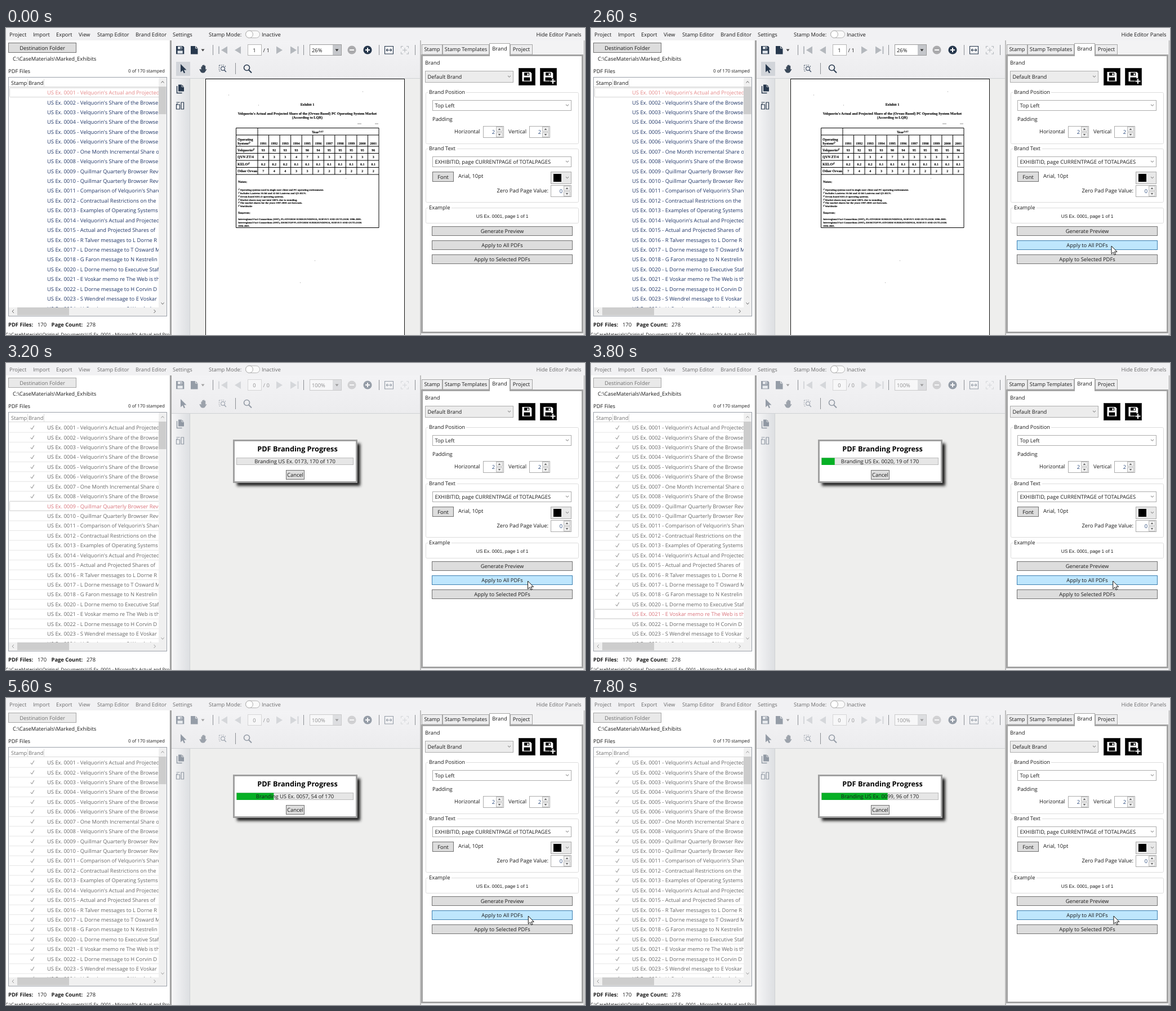
An HTML page that plays this animation: 1028x545 px, repeating every 8000 ms.

```html
<!DOCTYPE html>
<html lang="en">
<head>
<meta charset="utf-8">
<title>PDF branding</title>
<style>
html,body{margin:0;width:100%;height:100%;overflow:hidden;background:#fff}
svg{display:block;width:100%;height:100%}
text{font:9.4px "Open Sans",sans-serif;fill:#1a1a1a;text-rendering:geometricPrecision;white-space:pre}
.b{font-weight:700}
.s{font-size:8px}
.h{font-size:12.7px;font-weight:700;fill:#000}
.arial{font:8.3px "Liberation Sans",sans-serif}
.mid{text-anchor:middle}
.end{text-anchor:end}
.doc text{font:bold 4.6px "Liberation Serif",serif;fill:#000;stroke:#000;stroke-width:.12}
.doc .t{font-size:6.3px}
.doc .c{font-size:6px}
.doc .sup{font-size:4px}
.row text{fill:#1f3566}
.row.on text{fill:#e58888}
.row .box,.row .tick,.row .rule{visibility:hidden}
.row.on .box,.row.done .tick,.busy .rule{visibility:visible}
.busy .row text{fill:#666}
.busy .row.on text{fill:#d9737b}
.busy .dim{opacity:.62}
.busy .fade{opacity:.45}
.sel{fill:#d2d5da}
.busy .sel{fill:none}
#hot.on rect{fill:#bee6fd;stroke:#3c7fb1}
</style>
</head>
<body>
<svg id="stage" viewBox="0 0 1028 545" preserveAspectRatio="none"></svg>
<script>
const svg = document.getElementById('stage');
const ink = '#27384d';

// markup helpers
const rect = (x, y, x2, y2, fill, stroke, more = '') =>
  `<rect x="${x}" y="${y}" width="${x2 - x}" height="${y2 - y}" fill="${fill}"${stroke ? ` stroke="${stroke}"` : ''} ${more}/>`;
const circle = (x, y, r, fill, stroke = 'none', w = 1) =>
  `<circle cx="${x}" cy="${y}" r="${r}" fill="${fill}" stroke="${stroke}" stroke-width="${w}"/>`;
const text = (x, y, s, cls = '', more = '') => `<text x="${x}" y="${y}" class="${cls}" ${more}>${s}</text>`;
const path = (d, fill = 'none', stroke = 'none', w = 1, more = '') =>
  `<path d="${d}" fill="${fill}" stroke="${stroke}" stroke-width="${w}" ${more}/>`;
const group = (s, cls = '', more = '') => `<g class="${cls}" ${more}>${s}</g>`;
const chevron = (x, y, dx, dy) =>
  path(dx ? `M${x - dx} ${y - 3}L${x + dx} ${y}L${x - dx} ${y + 3}` : `M${x - 2.5} ${y - dy}L${x} ${y + dy}L${x + 2.5} ${y - dy}`, 'none', '#666');
const button = (x, y, x2, y2, s) => rect(x + .5, y + .5, x2 - .5, y2 - .5, '#ddd', '#707070') +
  text((x + x2) / 2, (y + y2) / 2 + 3.5, s, 'mid');
const combo = (x, y, x2, y2, s, fill = '#fff') => rect(x + .5, y + .5, x2 - .5, y2 - .5, fill, '#acacac') +
  text(x + 4.5, (y + y2) / 2 + 3.7, s) + chevron(x2 - 7.5, (y + y2) / 2 - .5, 0, 1.2);
const spinner = (x, y, v) => {
  const half = dy => rect(x + 23.5, y + dy, x + 34.5, y + dy + 8, '#f0f0f0', '#bbb');
  return rect(x + .5, y + .5, x + 36.5, y + 20.5, '#fff', '#acacac') + text(x + 21, y + 14, v, 'end', 'style="fill:#2b4a7c"') +
    half(1.5) + half(11.5) + path(`M${x + 26.7} ${y + 7}l2.3 -3 2.3 3zM${x + 26.7} ${y + 14}l2.3 3 2.3 -3z`, '#666');
};
const box = (y, y2, s, w) => rect(745.5, y + .5, 1016.5, y2 + .5, 'none', '#dcdcdc', 'rx="2"') +
  rect(749, y - 4, 751 + w, y + 5, '#fff') + text(751, y + 3.3, s);
const floppy = (x, y, k, c, hole) => group(
  path('M0 0H12L14 2V14H0Z', c) + rect(3, 1, 10.5, 5.5, hole) + rect(7.5, 2, 9.5, 5, c) + rect(2.5, 8, 11.5, 13, hole),
  '', `transform="translate(${x} ${y}) scale(${k})"`);
const bar = (x, y, y2) => path(`M${x} ${y}V${y2}`, 'none', '#8b8e93');

const exhibitNo = n => String(n + (n > 18) + (n > 30) + (n > 44)).padStart(4, '0');
const share = "Velquorin's Share of the Browser M", actual = "Velquorin's Actual and Projected S";
const titles = [actual, share, share, share, share, share, 'One Month Incremental Share of', share,
  'Quillmar Quarterly Browser Revenue', 'Quillmar Quarterly Browser Revenue', "Comparison of Velquorin's Share",
  'Contractual Restrictions on the', 'Examples of Operating Systems', actual, 'Actual and Projected Shares of',
  'R Talver messages to L Dorne R', 'L Dorne message to T Osward M', 'G Faron message to N Kestrelin', 'L Dorne memo to Executive Staff',
  'E Voskar memo re The Web is the', 'L Dorne message to H Corvin D', 'S Wendrel message to E Voskar', 'H Corvin memo to S Wendrel'];

function menu() {
  const items = [[6, 'Project'], [48, 'Import'], [89, 'Export'], [129, 'View'], [162, 'Stamp Editor'], [230, 'Brand Editor'],
    [296, 'Settings'], [360, 'Stamp Mode:'], [454, 'Inactive']];
  return rect(0, 0, 1028, 22, '#f1f1f3') +
    group(items.map(([x, s]) => text(x, 15, s)).join('') + text(1021.5, 15, 'Hide Editor Panels', 'end'), 'dim') +
    rect(425.5, 5, 450.5, 17.5, '#fafafa', '#b5b5b5', 'rx="6.2"') + circle(432, 11.2, 6.4, '#fff', '#aaa');
}

function row(title, i) {
  const y = 114.5 + 17.43 * i;
  return group(path(`M6 ${y + 8.7}H271`, 'none', '#e6e6e6', 1, 'class="rule"') +
    rect(6.5, y - 8.3, 280, y + 8.2, '#fff', '#d3d3d3', 'class="box" rx="1"') +
    path(`M43.8 ${y + .5}l2.2 2.8 3.8 -6.6`, 'none', '#777', .9, 'class="tick"') +
    text(73, y + 3.6, `US Ex. ${exhibitNo(i + 1)} - ${title}`), 'row');
}

function files() {
  return rect(0, 22, 290, 545, '#fff') + group(button(4, 26, 125, 44, 'Destination Folder'), 'dim') +
    text(12, 58.3, 'C:\\CaseMaterials\\Marked_Exhibits') + text(4, 79.5, 'PDF Files') + text(282, 79, '0 of 170 stamped', 's end') +
    rect(4.5, 87.5, 285.5, 511.5, '#fff', '#9a9fa8') +
    group(text(9, 101, 'Stamp') + text(40, 101, 'Brand'), 'dim') + path('M38.5 90V104M67.5 90V104M5 104.5H271', 'none', '#dadada') +
    group(titles.map(row).join(''), '', 'clip-path="url(#list)"') +
    rect(271, 88, 285, 496, '#f0f0f0') + rect(271, 104, 284.5, 153, '#cdcdcd') + rect(5, 496, 285, 511, '#f0f0f0') +
    rect(20, 496, 112, 510, '#cdcdcd') +
    group(chevron(278, 96, 0, -1.5) + chevron(278, 489, 0, 1.5) + chevron(12.5, 503, -1.5) + chevron(264, 503, 1.5), 'dim') +
    text(4, 530, 'PDF Files:', 'b') + text(56, 530, '170') + text(80.5, 530, 'Page Count:', 'b') + text(143, 530, '278') +
    text(-1, 546.5, "C:\\CaseMaterials\\Original_Documents\\US Ex. 0001 - Microsoft's Actual and Proj", 's') +
    rect(290, 22, 294, 545, '#f0f0f0') + rect(291, 22, 294, 545, '#a3a3a3');
}

function toolbar() {
  const round = (x, c, plus) => circle(x, 39, 7.6, c) + path(`M${x - 4} 39h8${plus ? `M${x} 35v8` : ''}`, 'none', '#fff', 2);
  const top = floppy(302, 32, 1.02, ink, '#dfe4ea') +
    path('M328 32h8.5l4 4v10.5h-12.5z', ink) + path('M336.5 32v4h4', 'none', '#eee') + path('M346.5 37.5h6l-3 4z', '#444') +
    path('M377 32.5h2v13.5h-2zM393 32.5v13.5l-11-6.75zM417 32.5v13.5l-11-6.75zM480 32.5v13.5l11-6.75zM505 32.5v13.5l11-6.75zM517.5 32.5h2v13.5h-2z', '#b4b8bd') +
    rect(429.5, 29.5, 453.5, 48.5, '#fff', '#b5b5b5') + text(441, 42.5, '1', 'mid', 'id="page"') + text(456.5, 42.5, '/ 1', '', 'id="pages"') +
    rect(539.5, 29.5, 595.5, 48.5, '#fff', '#9a9a9a') + rect(580, 30, 595, 48, '#c4c6ca') + path('M584.5 37.5h6l-3 4z', '#333') +
    text(543, 42.7, '26%', '', 'id="zoom"') + round(614, '#aaaaac') + round(642, ink, true) +
    path('M672.5 32.5h15v13.5h-15zM675.5 39.2h9M677.5 37l-2.2 2.2 2.2 2.2M682.5 37l2.2 2.2-2.2 2.2', 'none', ink, 1.1) +
    path('M701.5 36v-3.5h3.5M711 32.5h3.5v3.5M701.5 42.500v3.5h3.5M711 46h3.5v-3.5M704 39.2h8M708 35.2v8', 'none', '#b4b8bd', 1.1);
  const tools = path('M310 64v14.500l3.600-3.200 2.300 5 2.200-1-2.300-4.800h4.700z', ink) +
    path('M346.500 74v-5q.9-1.300 1.800 0v-2.500q1-1.400 2 0v-.6q1.100-1.200 2 0v1.300q1-1 1.900 0v6.800q1.300-1.700 2.300-.8l-3.600 5.600q-1 1-3.600 1t-3.600-1.800l-2.400-4.400q1.500-1.300 3.200.4z', '#3a4859') +
    path('M378.500 66h9.500M378.500 66v10M378.500 76.500h3M389.500 67v2', 'none', '#566372', 1, 'stroke-dasharray="2 1.300"') +
    circle(385, 72, 3.4, 'none', '#46546a', 1.2) + path('M387.500 74.500l3.300 3.500', 'none', '#46546a', 1.6) +
    circle(427.5, 70.5, 5, 'none', ink, 1.6) + path('M431 74.500l5 5', 'none', ink, 2);
  const side = path('M306 100.500h6l4 4v8h-10z', ink) + path('M303.500 103v12.500h9', 'none', ink, 1.5) + path('M312 100.500v4h4', 'none', '#eee', .8) +
    path('M302.500 132h6M302.500 136l2-2M302.500 144h6v-8h-6zM311 132h4.500v12H311z', 'none', ink, 1.2);
  return rect(294, 22, 735, 90, 'url(#tool)') + rect(302, 60, 327, 85, '', '', 'class="sel"').replace('fill=""', '') +
    [367.5, 528.5, 662.5, 726.5].map(x => bar(x, 30, 48)).join('') + bar(407.5, 62, 82) +
    rect(294, 90, 326, 545, 'url(#side)') + path('M294 89.5H735M326.5 90V545', 'none', '#cfd1d4') + group(top + tools + side, 'fade');
}

function sheet() {
  const col = i => 447 + i * 19.545;
  const rows = [['Velquorin²⁾', '93 92 93 93 90 94 95 95 95 95 96'], ['QVN ZT/4', '0 3 3 4 7 3 3 3 3 3 3'],
    ['KELO³⁾', '0.2 0.2 0.2 0.1 0.1 0.1 0.1 0.1 0.1 0.1 0.1'], ['Other Orvan', '7 4 4 3 3 2 2 2 2 2 2']];
  const cell = (s, i, y) => text(col(i + .5), y, s, 'c mid');
  let lines = 'M408.5 177.5H662V354.5H408.5ZM408 190H662M447 177.5V260';
  for (let i = 1; i < 11; i++) lines += `M${col(i)} 190V260`;
  for (let i = 0; i < 5; i++) lines += `M408 ${210 + i * 12.5}H662`;
  const notes = ['¹⁾ Operating systems used in single-user client and PC operating environment.', '²⁾ Includes Lanterns 16-bit and 32-bit Lanterns and QV-RUN.',
    '³⁾ Orvan-based KELO operating systems.', '⁴⁾ Market shares may not total 100% due to rounding.',
    '⁵⁾ The market shares for the years 1997-2001 are forecasts.', '⁶⁾ Worldwide'];
  const sources = ['Interregional Fact Consortium (1997), PLATFORM SURROUNDINGS, SURVEY AND OUTLOOK 1996-2001.',
    'Interregional Fact Consortium (1997), DESKTOP PLATFORM SURROUNDINGS, SURVEY AND OUTLOOK', '1996-2001.'];
  return rect(354.5, 90.5, 707.5, 560, '#fff', '#111') +
    text(535, 137.5, 'Exhibit 1', 't mid') + text(535, 153.7, "Velquorin's Actual and Projected Share of the (Orvan-Based) PC Operating System Market", 't mid') +
    text(535, 161, '(According to LQR)', 't mid') + path(lines, 'none', '#000', 1) +
    text(543, 186.5, 'Year<tspan class="sup" dy="-2">3,4,5</tspan>', 't') + text(411, 199.5, 'Operating', 't') + text(411, 206.8, 'System¹⁾', 't') +
    Array.from({length: 11}, (_, i) => cell(1991 + i, i, 206.5)).join('') +
    rows.map(([name, v], r) => {
      const y = 218.5 + r * 12.5;
      return text(411, y, name, 't') + v.split(' ').map((s, i) => cell(s, i, y)).join('');
    }).join('') +
    text(412, 275, 'Notes:', 'c') + notes.map((s, i) => text(412, 288.8 + i * 5.9, s)).join('') +
    text(412, 330, 'Sources:', 'c') + sources.map((s, i) => text(412, 341 + i * 5.9, s)).join('') +
    path('M624 170h7M655 170h6M633 113h1M395 119h1M448 137h1M603 267h1M548 413h1M522 452h1', 'none', '#777', .8);
}

function panel() {
  const tab = (x, x2, s, on) => rect(x + .5, on ? 27.5 : 29.5, x2 - .5, 47, on ? '#fff' : '#ededee', '#a5a5a5') + text((x + x2) / 2, on ? 40 : 41, s, 'mid');
  const save = x => rect(x + .5, 71.5, x + 29.5, 101.5, '#000', '#333') + floppy(x + 6.5, 78, 1.2, '#fff', '#000');
  return rect(735, 22, 1028, 545, '#f3f3f4') + rect(735, 22, 737, 545, '#bdbdbd') +
    tab(738, 775, 'Stamp') + tab(775, 858, 'Stamp Templates') + tab(895, 935, 'Project') +
    rect(738.5, 48.5, 1023.5, 540.5, '#fff', '#a3a3a3', 'stroke-width="3"') + tab(858, 895, 'Brand', true) + rect(859, 45, 894, 50, '#fff') +
    rect(1026, 22, 1027, 545, '#999') +
    text(744, 65, 'Brand') + combo(744, 76, 901, 97, 'Default Brand', '#ececec') + save(910) +
    save(948) + path('M971 89v11M965.5 94.5h11', 'none', '#000', 5) + path('M971 90v9M966.5 94.5h9', 'none', '#fff', 2) +
    box(114, 205, 'Brand Position', 66) + combo(757, 128, 1004, 147, 'Top Left') + text(757, 165.3, 'Padding') +
    text(796, 187, 'Horizontal') + spinner(847, 174, 2) + text(892, 187, 'Vertical') + spinner(929, 174, 2) +
    box(214, 309, 'Brand Text', 50) + combo(757, 228, 1004, 247, 'EXHIBITID, page CURRENTPAGE of TOTALPAGES') +
    button(757, 255, 795, 273, 'Font') + text(803, 265.5, 'Arial, 10pt') + combo(967, 255, 1004, 277, '', '#e8e8e8') + rect(972, 259, 986, 273, '#000') +
    text(963, 291.5, 'Zero Pad Page Value:', 'end') + spinner(967, 279, 0) +
    box(319, 346, 'Example', 40) + text(881, 336.7, 'US Ex. 0001, page 1 of 1', 'arial mid') +
    button(756, 352, 1006, 369, 'Generate Preview') + group(button(756, 377, 1006, 394, 'Apply to All PDFs'), '', 'id="hot"') +
    button(756, 402, 1006, 419, 'Apply to Selected PDFs');
}

function dialog() {
  return rect(410, 143, 629, 218, '#222', '', 'filter="url(#blur)"') +
    rect(404.5, 137.5, 622.5, 211.5, '#fff', '#a0a0a0', 'stroke-width="3"') + text(517.5, 157, 'PDF Branding Progress', 'h mid') +
    rect(409.5, 168.5, 616.5, 180.5, '#e6e6e6', '#bcbcbc') + rect(409.5, 168.5, 409.5, 181, '#06b025', '', 'id="fill"') +
    text(513, 178.3, '', 'mid', 'id="label"') + button(497, 190, 530, 207, 'Cancel');
}

const linear = (id, c1, c2, dir) => `<linearGradient id="${id}" x2="${dir}" y2="${1 - dir}"><stop stop-color="${c1}"/><stop offset="1" stop-color="${c2}"/></linearGradient>`;
svg.innerHTML = `<defs><clipPath id="list">${rect(6, 105, 271, 496, '#000')}</clipPath>` +
  `<clipPath id="view">${rect(327, 90, 735, 545, '#000')}</clipPath>` +
  '<filter id="blur" x="-10%" y="-20%" width="120%" height="140%"><feGaussianBlur stdDeviation="2.5"/></filter>' +
  linear('tool', '#f3f3f5', '#ececee', 0) + linear('side', '#f6f6f7', '#dddfe2', 1) + '</defs>' +
  rect(0, 0, 1028, 545, '#fff') + rect(294, 90, 735, 545, '#eeeeed') + menu() + files() + toolbar() +
  group(sheet(), 'doc', 'id="sheet" clip-path="url(#view)"') + panel() + group(dialog(), '', 'id="dialog"') +
  path('M0 0V14.2L3.3 11.2L5.5 16L7.7 15L5.5 10.3H10Z', '#fff', '#111', 1, 'id="cursor"');

const $ = id => document.getElementById(id);
const rowEls = [...svg.querySelectorAll('.row')];
const show = (el, on) => el.setAttribute('visibility', on ? 'visible' : 'hidden');

// pointer route: time, x, y
const route = [[600, 1003, 360], [1000, 990, 377], [1200, 970, 386], [1600, 940, 390], [2200, 924, 387], [2600, 924, 387],
  [3200, 926.5, 387], [7800, 928, 387]];
function pointer(t) {
  const k = Math.max(1, route.findIndex(p => p[0] >= t));
  const [a, b] = [route[k - 1], route[k]], f = (t - a[0]) / (b[0] - a[0]);
  return [a[1] + (b[1] - a[1]) * f, a[2] + (b[2] - a[2]) * f];
}

function draw(ms) {
  const t = Math.floor(ms / 200) * 200;
  const busy = t >= 2800, done = busy ? Math.round((t - 2800) * .0192) : 0;
  const stale = t < 3400, n = stale ? 170 : done;
  svg.classList.toggle('busy', busy);
  show($('sheet'), !busy);
  show($('dialog'), busy);
  rowEls.forEach((el, i) => {
    el.classList.toggle('on', i === done);
    el.classList.toggle('done', i < done);
  });
  $('page').textContent = busy ? 0 : 1;
  $('pages').textContent = busy ? '/ 0' : '/ 1';
  $('zoom').textContent = busy ? '100%' : '26%';
  $('label').textContent = `Branding US Ex. ${exhibitNo(n)}, ${n} of 170`;
  $('fill').setAttribute('width', stale ? 0 : 207.5 * n / 170);
  $('hot').classList.toggle('on', t >= 1200);
  show($('cursor'), t >= 600);
  if (t >= 600) $('cursor').setAttribute('transform', `translate(${pointer(t).join(' ')})`);
}

const start = performance.now();
function tick(now) {
  draw(Math.max(0, now - start) % 8000);
  requestAnimationFrame(tick);
}
draw(0);
requestAnimationFrame(tick);
</script>
</body>
</html>
```
